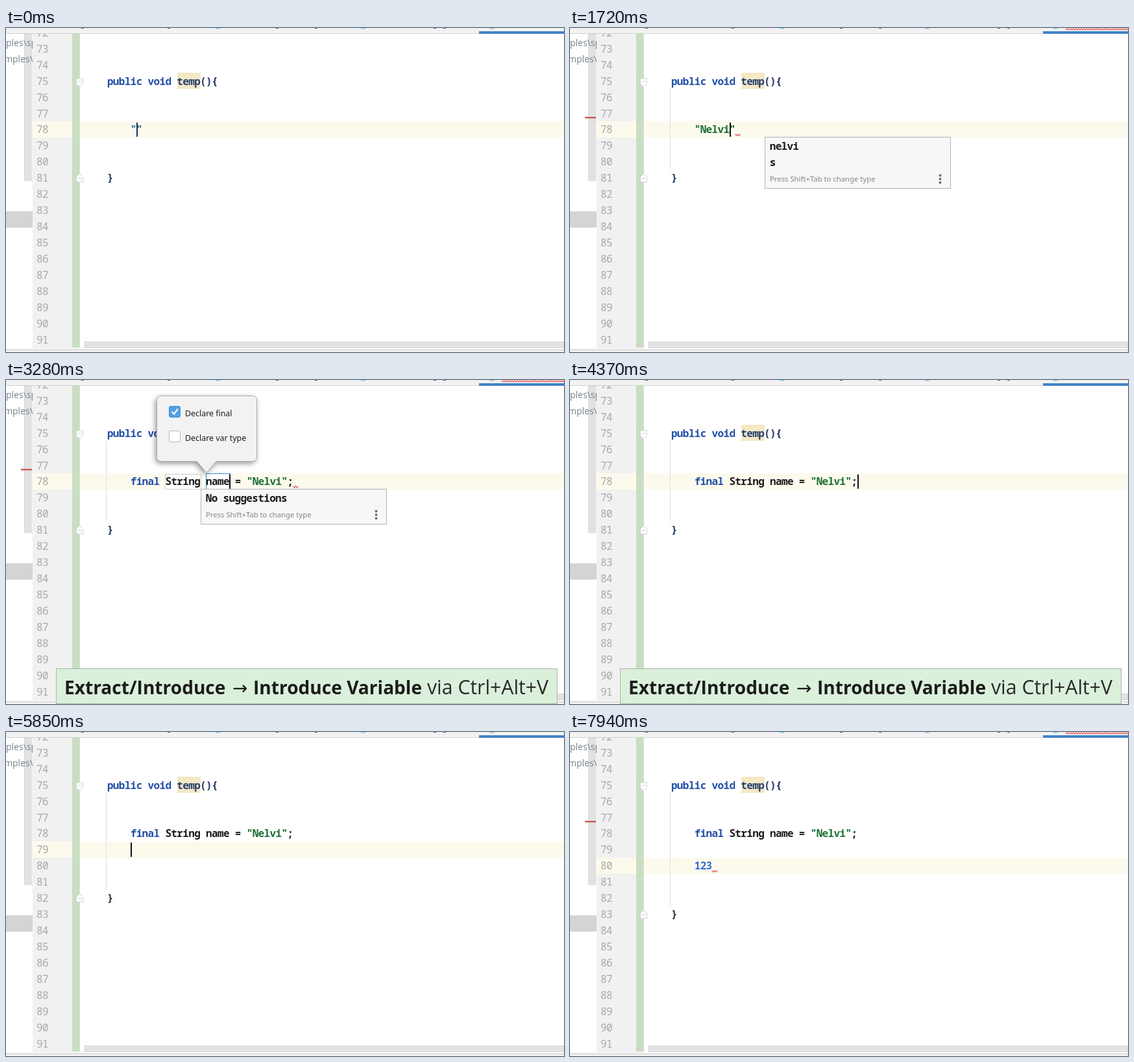
An HTML page with a canvas for the animation above (8 s loop, 860 by 500 pixels).

```html
<!DOCTYPE html>
<html lang="en">
<head>
<meta charset="utf-8">
<title>Introduce variable</title>
<style>
html, body { margin: 0; width: 100%; height: 100%; overflow: hidden; background: #fff; }
canvas { display: block; }
</style>
</head>
<body>
<canvas id="stage" width="860" height="500"></canvas>
<script>
const ctx = document.getElementById('stage').getContext('2d');
const LOOP = 8000, ADVANCE = 8.95, LINE = 24.95, CODE_X = 156.2;
const MONO = '"Noto Sans Mono", "DejaVu Sans Mono", monospace';
const MONO_SIZE = 16, MONO_RATIO = .6;
const UI = '"Noto Sans", "Open Sans", sans-serif';
const BANNER = '"Open Sans", "Noto Sans", sans-serif';
const INK = '#1c1c1c', NAVY = '#1f3263', KEYWORD = '#2350a8', STRING = '#1f7034', ERROR = '#d9534f';
const PERSON = 'Nelvi', SUGGESTION = 'nelvi';

const lineY = n => 32 + (n - 73) * LINE;
const colX = c => CODE_X + c * ADVANCE;
const progress = (t, from, to) => Math.min(1, Math.max(0, (t - from) / (to - from)));
// Number of moments that have already passed
const passed = (t, ...moments) => moments.filter(m => t >= m).length;

function rect(x, y, w, h, fill, stroke) {
  ctx.fillStyle = fill;
  ctx.fillRect(x, y, w, h);
  if (stroke) {
    ctx.strokeStyle = stroke;
    ctx.lineWidth = 1;
    ctx.strokeRect(x + .5, y + .5, w - 1, h - 1);
  }
}

function text(str, x, y, font, fill) {
  ctx.font = font;
  ctx.fillStyle = fill;
  ctx.fillText(str, x, y);
}

// Tight tracking imitates a tall, narrow code face
function mono(str, x, y, fill, weight = 600) {
  ctx.letterSpacing = `${ADVANCE - MONO_SIZE * MONO_RATIO}px`;
  text(str, x - .3, y, `${weight} ${MONO_SIZE}px ${MONO}`, fill);
  ctx.letterSpacing = '0px';
}

// Draws [text, colour] pieces one after another; returns the end column
function code(line, col, ...pieces) {
  for (const [str, fill] of pieces) {
    mono(str, colX(col), lineY(line) + 5.7, fill);
    col += str.length;
  }
  return col;
}

function path(points, { fill, stroke, width = 1, closed = false }) {
  ctx.beginPath();
  points.forEach(([x, y]) => ctx.lineTo(x, y));
  if (closed) ctx.closePath();
  if (fill) { ctx.fillStyle = fill; ctx.fill(); }
  if (stroke) { ctx.strokeStyle = stroke; ctx.lineWidth = width; ctx.stroke(); }
}

function squiggle(x, y, width, step, height, color = ERROR) {
  const points = [];
  for (let i = 0; i * step <= width; i++) points.push([x + i * step, y + (i % 2) * height]);
  path(points, { stroke: color, width: 1.2 });
}

const codeSquiggle = (line, col, color) => squiggle(colX(col), lineY(line) + 7, 8, 2, 2.5, color);

function caret(line, col, alpha = 1, color = '#111') {
  ctx.globalAlpha = alpha;
  rect(Math.round(colX(col)), lineY(line) - 11, 2, 22, color);
  ctx.globalAlpha = 1;
}

function foldMark(line, dir) {
  const y = lineY(line) + 1;
  path([[108.5, y - 5 * dir], [118.5, y - 5 * dir], [118.5, y + 3 * dir], [113.5, y + 8 * dir], [108.5, y + 3 * dir]],
    { fill: '#fff', stroke: '#d2d2d2', closed: true });
  rect(111, y - 1, 5, 1, '#c4c4c4');
}

function sidePanel(hasError) {
  ctx.save();
  ctx.beginPath();
  ctx.rect(0, 9, 41, 486);
  ctx.clip();
  rect(28, 9, 13, 228, '#f0f0f0');
  rect(28, 9, 11, 226, '#e2e2e2', '#d6d6d6');
  text('ples\\sp', 0, 27.5, `14px ${BANNER}`, '#71818c');
  text('mples\\', -3, 52.5, `14px ${BANNER}`, '#71818c');
  rect(0, 283, 41, 25, '#d4d4d4');
  if (hasError) rect(23, 137, 17, 2.5, '#cb5f5a');
  ctx.restore();
}

function tabBar(hasError) {
  rect(0, 0, 860, 9, '#f2f2f2');
  rect(0, 8, 860, 1, '#d0d0d0');
  for (const x of [116, 249, 416, 476, 659, 674]) rect(x, 0, 4, 1, '#4c5c86');
  for (const x of [323, 547, 745]) rect(x, 0, 7, 1.5, '#8fd0ee');
  rect(729, 5, 131, 4, '#4083c9');
  if (hasError) squiggle(764, 1, 96, 2, 2);
}

function editor(currentLine, braceLine, hasGuide, braceColor) {
  rect(41, 9, 73, 486, '#f1f1f1');
  rect(41, lineY(currentLine) - 12.75, 819, 25, '#fcfaed');
  rect(102, 9, 12, 484, '#c9dec2');
  rect(113, 9, 1, 484, '#d9e3d5');
  for (let n = 72; n <= 91; n++) mono(n, 47.3, lineY(n) + 5.7, '#a8a8a8', 500);
  if (hasGuide) rect(154, 93, 1, lineY(braceLine) - 106, '#e0e0e0');
  foldMark(75, 1);
  foldMark(braceLine, -1);
  rect(264, 69, 36, 25, '#f5e8c5');
  code(75, 0, ['public void ', KEYWORD], ['temp', '#26406f'], ['(){', NAVY]);
  code(braceLine, 0, ['}', braceColor]);
  rect(121, 484, 739, 10, '#e3e3e3', '#d2d2d2');
  rect(0, 496, 860, 4, '#f2f2f2');
  rect(0, 496, 860, 1, '#c8c8c8');
}

function suggestions(items) {
  const height = 29.5 + items.length * 25;
  rect(300, 168, 287, Math.round(height), '#f7f7f7', '#b2b2b2');
  items.forEach((item, i) => mono(item, 308, 187.7 + i * 25, INK));
  const y = 163 + items.length * 25;
  text('Press Shift+Tab to change type', 308, y + 24, `11.3px ${UI}`, '#858585');
  for (const dy of [13.5, 19, 24.5]) {
    ctx.beginPath();
    ctx.arc(570.5, y + dy + 1, 1.9, 0, 7);
    ctx.fillStyle = '#6e6e6e';
    ctx.fill();
  }
}

function checkbox(y, label, checked) {
  ctx.beginPath();
  ctx.roundRect(251.5, y + .5, 17, 17, 2.5);
  ctx.fillStyle = checked ? '#4f9ee3' : '#fff';
  ctx.fill();
  ctx.strokeStyle = checked ? '#4a90d0' : '#b4b4b4';
  ctx.lineWidth = 1;
  ctx.stroke();
  if (checked) path([[255.5, y + 9], [259, y + 12.5], [265, y + 4.5]], { stroke: '#fff', width: 2.2 });
  text(label, 276, y + 15.5, `12.4px ${UI}`, '#1c1c1c');
}

function balloon(alpha) {
  ctx.save();
  ctx.globalAlpha = alpha;
  ctx.beginPath();
  ctx.moveTo(238, 24.5);
  ctx.arcTo(386.5, 24.5, 386.5, 125.5, 6);
  ctx.arcTo(386.5, 125.5, 232.5, 125.5, 6);
  ctx.lineTo(324, 125.5);
  ctx.lineTo(309, 143);
  ctx.lineTo(294, 125.5);
  ctx.arcTo(232.5, 125.5, 232.5, 24.5, 6);
  ctx.arcTo(232.5, 24.5, 386.5, 24.5, 6);
  ctx.closePath();
  ctx.shadowColor = 'rgba(0,0,0,.45)';
  ctx.shadowBlur = 9;
  ctx.shadowOffsetX = -2;
  ctx.shadowOffsetY = 3;
  ctx.fillStyle = '#f2f2f2';
  ctx.fill();
  ctx.shadowColor = 'transparent';
  ctx.strokeStyle = '#ababab';
  ctx.lineWidth = 1;
  ctx.stroke();
  checkbox(40, 'Declare final', true);
  checkbox(78, 'Declare var type', false);
  ctx.restore();
}

function banner(alpha) {
  ctx.save();
  ctx.globalAlpha = alpha;
  rect(77, 445, 773, 55, '#dbf0db', '#a9b5a9');
  const bold = `bold 28.1px ${BANNER}`;
  text('Extract/Introduce', 90, 485, bold, INK);
  text('→', 349, 485, '28px "DejaVu Sans", sans-serif', INK);
  text('Introduce Variable', 381, 485, bold, INK);
  text('via Ctrl+Alt+V', 649, 485, `30.2px ${BANNER}`, '#2a2a2a');
  ctx.restore();
}

function typedLiteral(t, hasError) {
  const letters = passed(t, 320, 780, 940, 1090, 1240);
  const color = letters ? STRING : '#3d7587';
  const end = code(78, 4, [`"${PERSON.slice(0, letters)}"`, color]);
  if (hasError) codeSquiggle(78, end);
  caret(78, 5 + letters, 1, letters ? '#111' : '#1f3263');
}

function declaration(t, hasError) {
  const editing = t < 3910;
  const letters = passed(t, 2730, 2880, 3110, 3280);
  const name = letters ? 'name'.slice(0, letters) : SUGGESTION;
  if (editing) {
    rect(245, 145, 56, 24, '#fff', '#cfcfcf');
    rect(308, 144, name.length * 9 + 2, 25, letters ? '#fff' : '#a6d2ff', '#3c8bdc');
  }
  const stringColor = letters ? STRING : '#24442f';
  const end = code(78, 4, ['final ', KEYWORD], [`String ${name} = `, INK], [`"${PERSON}"`, stringColor], [';', INK]);
  if (hasError && t < 4220) codeSquiggle(78, end, letters ? ERROR : '#c99b45');
  if (t < 4370) {
    if (t < 2560 || letters) caret(78, 17 + name.length);
  } else if (t < 5000) caret(78, end);
}

function typedNumber(t, hasError) {
  const digits = passed(t, 6170, 6330, 6640);
  code(80, 4, ['123'.slice(0, digits), '#3768dc']);
  if (hasError) codeSquiggle(80, 7);
  const alpha = t < 6940 ? 1 : t < 7400 ? 0 : t < 7880 ? 1 : t < 7940 ? .5 : 0;
  caret(80, 4 + digits, alpha);
}

function draw(t) {
  const hasError = (t >= 480 && t < 4220) || t >= 7020;
  const newLines = passed(t, 5000, 6010);
  rect(0, 0, 860, 500, '#fff');
  editor(78 + newLines, 81 + newLines, t >= 400, newLines ? '#2c2c2c' : NAVY);
  sidePanel(hasError);
  tabBar(hasError);

  if (t < 1790) typedLiteral(t, hasError);
  else declaration(t, hasError);
  if (newLines === 1) caret(79, 4);
  if (newLines === 2) typedNumber(t, hasError);

  if (t >= 1870 && t < 4140) balloon(1 - progress(t, 3910, 4140));
  if (t >= 1720 && t < 3910) suggestions(t < 2800 ? [SUGGESTION, 's'] : ['No suggestions']);
  if (t >= 1870 && t < 5850) banner(t < 1950 || t >= 5780 ? .5 : 1);
}

function tick() {
  draw(performance.now() % LOOP);
  requestAnimationFrame(tick);
}
tick();
</script>
</body>
</html>
```
